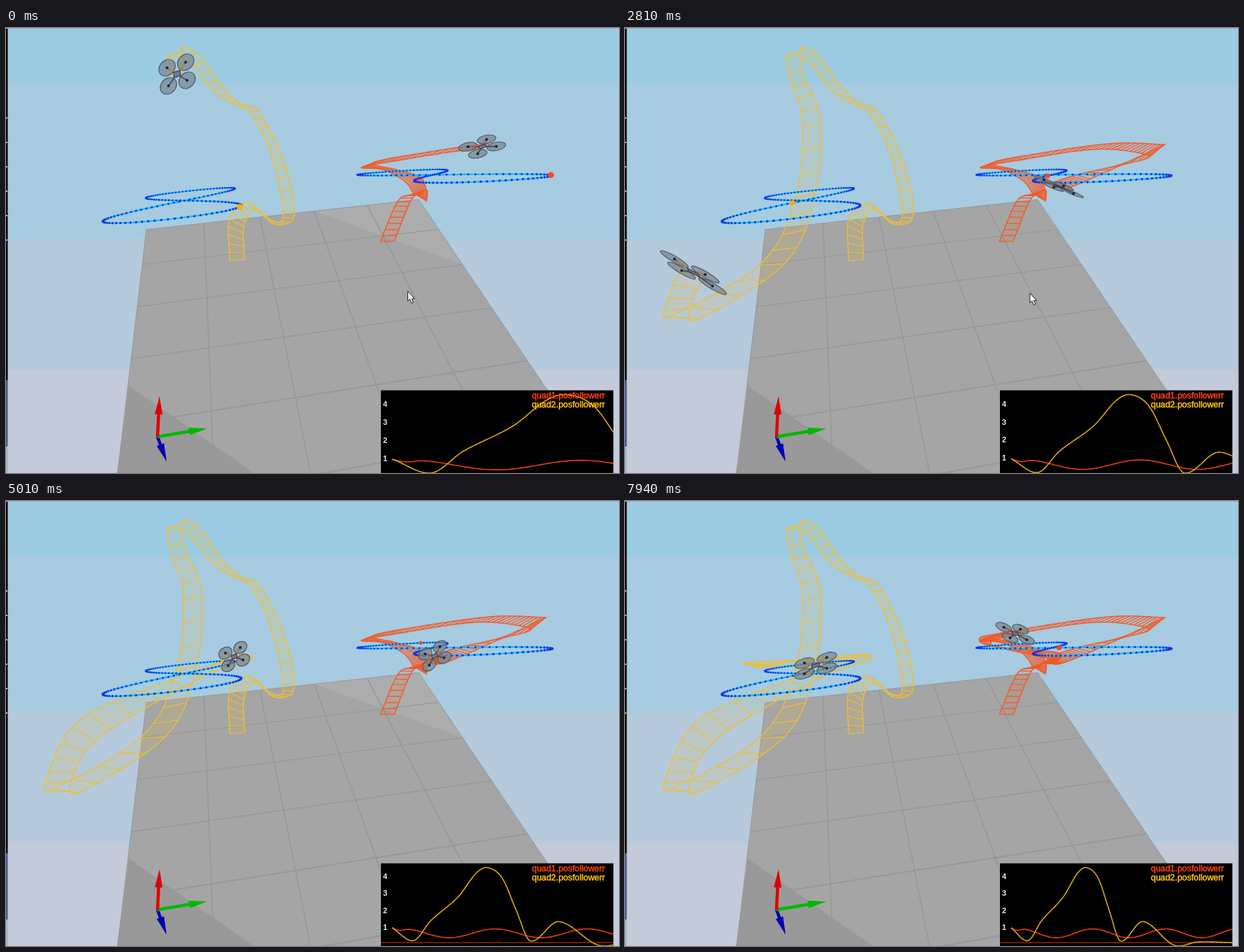
These frames come from a looping animation (878 by 638 pixels, 8 s). An HTML page with a canvas:

```html
<!DOCTYPE html>
<html lang="en">
<head>
<meta charset="utf-8">
<title>Quadrotor path following</title>
<style>
html, body { margin: 0; width: 100%; height: 100%; overflow: hidden; background: #000; }
canvas { display: block; width: 878px; height: 638px; }
</style>
</head>
<body>
<canvas id="stage" width="878" height="638"></canvas>
<script>
const ctx = document.getElementById('stage').getContext('2d');
const LOOP = 8000;
const LEAD = 6040;      // flight time before the loop begins
const TAU = 2 * Math.PI;
const { sin, cos, exp, min, max, floor, PI } = Math;

// Maps the unit square onto four screen corners, in perspective
function plane([x0, y0], [x1, y1], [x2, y2], [x3, y3]) {
  const ax = x1 - x2, ay = y1 - y2, bx = x3 - x2, by = y3 - y2;
  const cx = x0 - x1 + x2 - x3, cy = y0 - y1 + y2 - y3, den = ax * by - bx * ay;
  const g = (cx * by - bx * cy) / den, h = (ax * cy - cx * ay) / den;
  return (u, v) => {
    const w = g * u + h * v + 1;
    return [((x1 - x0 + g * x1) * u + (x3 - x0 + h * x3) * v + x0) / w,
            ((y1 - y0 + g * y1) * u + (y3 - y0 + h * y3) * v + y0) / w];
  };
}

// Smooth curve through timed keys, tangents from neighbours
function at(keys, t) {
  const n = keys.length - 1;
  t = min(max(t, keys[0][0]), keys[n][0]);
  let i = 0;
  while (i < n - 1 && t > keys[i + 1][0]) i++;
  const p = keys[max(i - 1, 0)], a = keys[i], b = keys[i + 1], q = keys[min(i + 2, n)];
  const h = b[0] - a[0], s = (t - a[0]) / h, r = 1 - s;
  return a.slice(1).map((v, k) => {
    const j = k + 1;
    const m0 = (b[j] - p[j]) / (b[0] - p[0]) * h, m1 = (q[j] - a[j]) / (q[0] - a[0]) * h;
    return r * r * ((1 + 2 * s) * v + s * m0) + s * s * ((1 + 2 * r) * b[j] - r * m1);
  });
}

const floorAt = plane([201, 289], [591, 246], [747, 477], [168, 569]);

// path: time, centre, half width of the ribbon; nose: time, forward vector
const drones = [
  {
    line: '#ebbf3c', fill: 'rgba(235,190,60,.15)', arm: '#c8962a', ball: '#ffb000', gap: 140,
    lap: plane([201, 243], [328, 230], [337, 254], [141, 275]),
    path: [
      [-6040, 331, 333, 11, -1], [-5300, 331, 277, 10, 6], [-4750, 352, 256, 4, 5],
      [-4050, 384, 279, 3, 3], [-3450, 405, 268, 8, 0], [-2700, 389, 186, 9, 4],
      [-2000, 356, 121, 6, -1], [-1550, 332, 109, 4, -1], [-1000, 304, 88, 7, -3],
      [-450, 266, 41, 9, -4], [-200, 242, 34, 10, -5], [0, 245, 66, 10, -3],
      [500, 267, 132, 13, -3], [950, 259, 238, 15, -6], [1500, 213, 336, 18, -1],
      [2090, 84, 416, 18, 3], [2400, 76, 399, 19, -2], [3000, 123, 324, 15, 12],
      [3590, 267, 252, 10, 3], [4450, 345, 224, 7, 3], [5010, 327, 223, 8, -3],
      [6970, 178, 235, 10, 3], [7940, 273, 236, 12, -3]
    ],
    nose: [[0, -1, -13], [950, -1, -11], [2090, -12, -4.5], [3590, 3.5, -13],
           [5010, -2, -9], [7940, 0, -7.7]]
  },
  {
    line: '#f05a28', fill: 'rgba(240,90,40,.14)', arm: '#c85a30', ball: '#ff4818', gap: 85,
    lap: plane([505, 211], [626, 203], [771, 210], [591, 221]),
    path: [
      [-6040, 546, 306, 10, 0], [-5400, 572, 246, 9, 0], [-4900, 594, 236, 8, -4],
      [-4400, 594, 243, 8, 5], [-3900, 593, 234, 8, -5], [-3000, 581, 216, 11, -3],
      [-2300, 549, 203, 10, 0], [-1600, 517, 197, 8, -3], [-900, 564, 187, 9, -4],
      [0, 682, 170, 10, -4], [950, 757, 174, 11, -7], [1250, 756, 179, 11, -9],
      [2090, 652, 215, 11, 3], [3590, 607, 233, 10, 1], [5010, 614, 222, 8, -4],
      [6970, 520, 206, 8, 2], [7350, 519, 197, 9, 2], [7940, 559, 190, 9, 1]
    ],
    nose: [[0, -7, -5], [950, -10, -2], [2090, -9, -5], [3590, -5, -5.5],
           [5010, -3, -8], [7940, -4.5, -7.7]]
  }
];

// Position errors over elapsed time
const err1 = e => .55 + .26 * cos(TAU * (e - 5150) / 4600)
  + .14 * exp(-e / 300) - .12 * exp(-(((e - 400) / 300) ** 2));
const err2Keys = [
  [0, .88], [1070, .12], [1936, 1.3], [3300, 2.7], [4200, 4.1], [4780, 4.42], [5500, 3.8],
  [6200, 1.9], [6900, .1], [8322, 1.24], [10300, -.15], [11800, .04], [14000, 0]
];
const err2 = e => at(err2Keys, e)[0];

function trace(points) {
  ctx.beginPath();
  points.forEach(([x, y]) => ctx.lineTo(x, y));
}
function shape(color, ...points) {
  trace(points);
  ctx.fillStyle = color;
  ctx.fill();
}
function line(color, width, ...points) {
  trace(points);
  ctx.strokeStyle = color;
  ctx.lineWidth = width;
  ctx.stroke();
}
function dot(color, x, y, r) {
  ctx.fillStyle = color;
  ctx.beginPath();
  ctx.arc(x, y, r, 0, TAU);
  ctx.fill();
}
function rect(color, x, y, w, h) {
  ctx.fillStyle = color;
  ctx.fillRect(x, y, w, h);
}

function drawSky() {
  rect('#9ccce3', 0, 0, 878, 79);
  rect('#a7cbe1', 0, 79, 878, 223);
  rect('#b6cadd', 0, 302, 878, 188);
  rect('#c3cad9', 0, 490, 878, 148);
}

function drawFloor(lit) {
  const grid = '#989898', far = 1.5;
  shape('#a5a5a5', floorAt(0, 0), floorAt(1, 0), floorAt(1, far), floorAt(0, far));
  shape('#999999', [176, 513], [355, 638], [159, 638]);
  if (lit) shape('#adadad', floorAt(.6, 0), floorAt(1, 0), floorAt(1, .5));
  for (let i = 0; i <= 5; i++) {
    line(grid, i % 5 ? 1.7 : 1, floorAt(i / 5, 0), floorAt(i / 5, far));
    line(grid, 1 + i * .3, floorAt(0, i / 4), floorAt(1, i / 4));
  }
}

function arrow(color, [x, y], length, angle) {
  ctx.save();
  ctx.translate(x, y);
  ctx.rotate(angle);
  line(color, 4.5, [0, 0], [length - 22, 0]);
  shape(color, [length - 26, -5.5], [length - 26, 5.5], [length, 0]);
  ctx.restore();
}

function drawAxes() {
  const origin = [217, 586];
  arrow('#0000b4', origin, 38, 1.22);
  arrow('#00b800', origin, 72, -.165);
  arrow('#e00000', origin, 58, -1.52);
}

function drawRibbon({ path, line: color, fill, gap }, t) {
  const rails = s => {
    const [x, y, dx, dy] = at(path, s);
    return [[x - dx, y - dy], [x + dx, y + dy]];
  };
  const left = [], right = [];
  for (let s = -LEAD; s < t + 25; s += 25) {
    const [l, r] = rails(min(s, t));
    left.push(l);
    right.push(r);
  }
  shape(fill, ...left, ...right.slice().reverse());
  line(color, 1.4, ...left);
  line(color, 1.4, ...right);
  for (let s = -LEAD; s < t; s += gap) line(color, 1.2, ...rails(s));
}

// Figure eight lying in the lap plane
const lapPoint = (lap, a) => lap((1 + sin(2 * a)) / 2, (1 + sin(a) * Math.SQRT2) / 2);

function drawLap({ lap }) {
  const points = [];
  for (let a = 0; a <= TAU + .05; a += .05) points.push(lapPoint(lap, a));
  line('#12bdf5', 2.2, ...points);
  for (let i = 0; i < 144; i++) {
    const a = i / 144 * TAU;
    dot('#1238e6', ...lapPoint(lap, a), 1.45 + .25 * sin(a));
  }
}

function drawBall({ lap, ball }, t) {
  const a = (52 + .04 * t + 12 * sin(TAU * t / 8800)) * PI / 180;
  dot(ball, ...lapPoint(lap, a), 3.5 + sin(a));
}

function drawDrone({ path, nose, arm }, t) {
  const [x, y, wx, wy] = at(path, t), [fx, fy] = at(nose, t);
  const sx = wx / .75, sy = wy / .75;
  const spot = (u, v) => [x + u * sx + v * fx, y + u * sy + v * fy];
  const flat = (draw, fill, edge) => {
    ctx.save();
    ctx.beginPath();
    ctx.transform(sx, sy, fx, fy, x, y);
    draw();
    ctx.restore();
    ctx.fillStyle = fill;
    ctx.fill();
    ctx.strokeStyle = edge;
    ctx.lineWidth = 1.2;
    ctx.stroke();
  };
  const rotors = [[-1, 1], [1, 1], [-1, -1], [1, -1]];
  for (const [u, v] of rotors) {
    flat(() => ctx.arc(u, v, .88, 0, TAU), 'rgba(122,134,146,.72)', '#525b63');
  }
  for (const [u, v] of rotors) {
    line('#50525c', 2, [x, y], spot(u, v));
    if (v > 0) line(arm, 1.5, spot(u * .2, v * .2), spot(u * .85, v * .85));
    dot('#22242e', ...spot(u, v), 2);
  }
  flat(() => ctx.rect(-.35, -.3, .7, .6), '#74778f', '#3a3c50');
}

function drawPlot(t) {
  const total = LEAD + t, times = [];
  for (let e = 0; e < total; e += 60) times.push(e);
  times.push(total);
  const values = times.map(err2), low = min(...values);
  const scale = 112.5 / (max(...values) - low);
  const py = v => 638 - (v - low) * scale;
  const curve = (err, color) =>
    line(color, 1.6, ...times.map(e => [553 + 317 * e / total, py(err(e))]));
  const label = (text, color, y) => {
    ctx.fillStyle = ctx.strokeStyle = color;
    ctx.fillText(text, 858, y);
    ctx.strokeText(text, 858, y);
  };

  ctx.save();
  ctx.beginPath();
  ctx.rect(537, 519.5, 333, 119);
  ctx.clip();
  rect('#000', 537, 519, 333, 119);
  line('#b02800', 1.3, [537, py(0)], [870, py(0)]);
  curve(err1, '#e83e08');
  curve(err2, '#dca810');
  ctx.textBaseline = 'middle';
  ctx.textAlign = 'center';
  ctx.font = 'bold 11px "Liberation Sans", Arial, sans-serif';
  ctx.fillStyle = '#e8e8e8';
  for (let v = 1; v < 5; v++) ctx.fillText(v, 543, py(v) + 3);
  ctx.textAlign = 'right';
  ctx.font = '12.4px "Liberation Sans", Arial, sans-serif';
  ctx.lineWidth = .5;
  label('quad1.posfollowerr', '#ff4010', 528);
  label('quad2.posfollowerr', '#ffc010', 541);
  ctx.restore();
}

function drawCursor(t) {
  if (t > 4300) return;
  const s = min(max((t - 2700) / 770, 0), 1), ease = s * s * (3 - 2 * s);
  const tip = [[0, 0], [0, 14], [3, 11], [5.5, 17], [8, 16], [5.5, 10.5], [9.5, 10.5], [0, 0]];
  ctx.save();
  ctx.translate(575.5 + 106.5 * ease, 377.5 + 63.5 * ease);
  shape('#fff', ...tip);
  line('#222', 1, ...tip);
  ctx.restore();
}

function drawEdge() {
  rect('#000', 0, 0, 2.5, 505);
  rect('#4c5a90', 0, 505, 2.5, 95);
  rect('#a8b4c4', 0, 600, 2.5, 38);
  for (let y = 128; y < 310; y += 35) rect('#b0b0b0', 0, y, 2, 2);
  rect('#a4adb0', 0, 0, 878, 1);
}

function draw(t) {
  drawSky();
  drawFloor(t < 120 || (t > 4980 && t < 5120));
  drawAxes();
  drones.forEach(d => drawRibbon(d, t));
  drones.forEach(drawLap);
  drones.forEach(d => drawBall(d, t));
  drones.forEach(d => drawDrone(d, t));
  drawCursor(t);
  drawPlot(t);
  drawEdge();
}

// The view refreshes eight times per block, about every 140 ms
const blocks = [120, 1250, 2390, 3470, 4610, 5680, 6730, 7810, 8850];
function snap(t) {
  t += 25;
  if (t < 120) return 0;
  const i = blocks.findIndex(b => b > t) - 1;
  const step = (blocks[i + 1] - blocks[i]) / 8;
  return blocks[i] + floor((t - blocks[i]) / step) * step;
}

let shown = -1;
const start = performance.now();
function tick() {
  const t = snap((performance.now() - start) % LOOP);
  if (t !== shown) draw(shown = t);
  requestAnimationFrame(tick);
}
tick();
</script>
</body>
</html>
```
